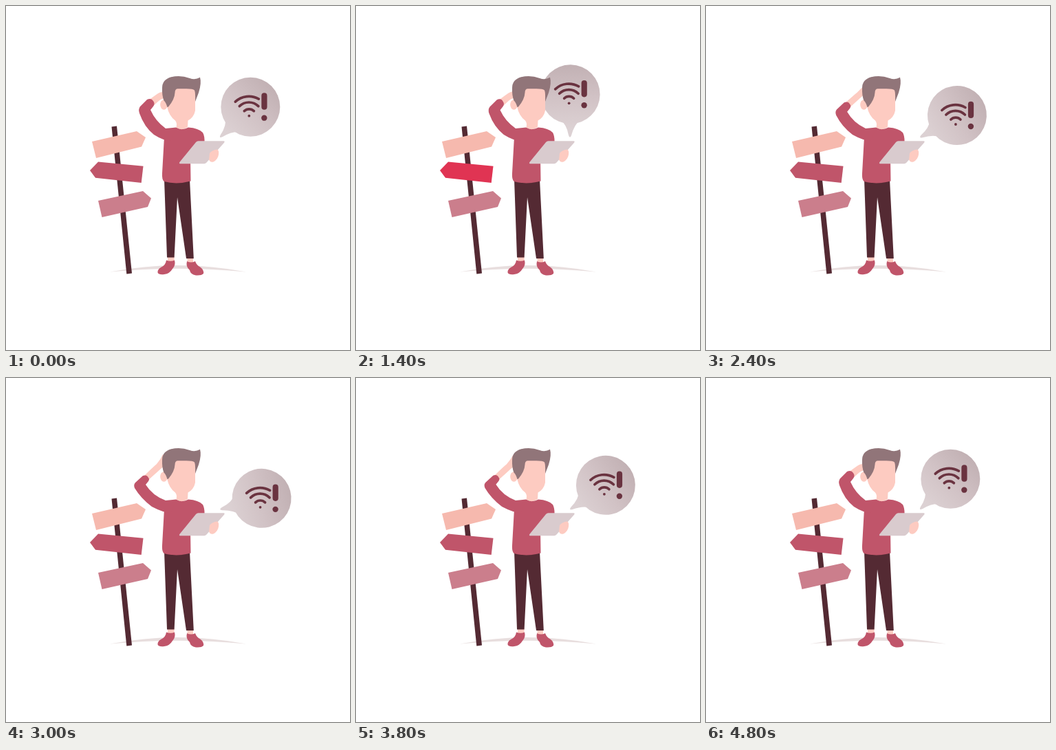
These frames come from a looping animation (500 by 500 pixels, 4840 ms). An HTML page:

```html
<!DOCTYPE html>
<html lang="en">
<head>
<meta charset="utf-8">
<title>Lost connection</title>
<style>
  html, body { margin: 0; width: 100%; height: 100%; overflow: hidden; background: #fff; }
  svg { display: block; width: 100vw; height: 100vh; }
  .dark { fill: #542a33; }
  .rose { fill: #c0556a; }
  .skin { fill: #fdcbc1; }
  .icon { fill: #6a3340; }
  .icon .arc { fill: none; stroke: #6a3340; stroke-width: 3.7; stroke-linecap: round; }
</style>
</head>
<body>
<svg viewBox="0 0 500 500">
  <defs>
    <linearGradient id="shade" gradientUnits="userSpaceOnUse" x1="311" y1="86" x2="311" y2="178">
      <stop offset="0" stop-color="#c2b1b4"/>
      <stop offset=".5" stop-color="#d1c2c5"/>
      <stop offset="1" stop-color="#dcd1d3"/>
    </linearGradient>
  </defs>

  <path fill="#e8dede" d="M151 386.5Q250 367.5 349 386.5Q250 377 151 386.5Z"/>

  <path class="dark" d="M153.5 175.5L161 174.5L183 388.5L175.3 389.5Z"/>
  <path id="sign1" d="M125 197L190 182L203 191L197 204.5L131 221Z"/>
  <path id="sign2" d="M134 226.5L199.5 232.7L196.7 257L130 249.7L122 239Z"/>
  <path fill="#cb7e8c" d="M134 283L199 269L211 279.5L206 292L139.5 307Z"/>

  <g id="bubble" fill="url(#shade)">
    <circle cx="311" cy="128.3" r="43"/>
    <path d="M296 165Q306 172 309 188Q311 193.5 313 188Q317 172 326 165Z"/>
  </g>
  <g id="icon" class="icon">
    <rect x="16" y="-20.3" width="8.2" height="24.4" rx="4.1"/>
    <circle cx="20" cy="16" r="4.2"/>
    <circle cx="-2" cy="13" r="1.9"/>
    <path class="arc" d="M-22 -7.5A29 29 0 0 1 12 -11.5"/>
    <path class="arc" d="M-16 -1A19.5 19.5 0 0 1 11.5 -1"/>
    <path class="arc" d="M-9 6A10 10 0 0 1 5 6"/>
  </g>

  <path class="skin" d="M235 363H244.5V373H235ZM263.5 364H272V374H263.5Z"/>
  <path class="dark" d="M230 252H267L272.8 367H262L249 278L244.6 365.5H234Z"/>
  <path class="rose" d="M233 369.5Q239 372 245 369.5Q247 377 242 382Q238 389 230 390Q222 391 220.5 387.5Q220 383 225 380Q232 377 233 369.5Z"/>
  <path class="rose" d="M263 371Q269 374 275 371Q277 377 283 380Q288 384 287 389Q284 392 276 391.4Q268 390 267 384Q261 379 263 371Z"/>

  <path id="forearm" class="skin"/>
  <path class="rose" d="M232 178Q240 177 247 176.5Q257 181 265 176.5Q280 177.5 286 184Q289 189 288.5 200L268 222L268.5 254.5Q248 260 229.5 255Q226.5 252 227 243L230 190Z"/>
  <path id="sleeve" class="rose"/>
  <path fill="#f2e3e5" d="M274.5 201L275.3 201L276 209L274.5 209Z"/>
  <path fill="#d9cbce" d="M279.5 196.3H316.5Q318.5 196.6 317 198.7L291.5 227.6Q290 229.2 288 229.2H253Q251 228.8 252.5 226.7L276 198Q277.5 196.3 279.5 196.3Z"/>
  <path class="skin" d="M296 214Q300 209 307 208.5Q310 210 309 216Q308 223 301.5 226.5Q296 227.5 295 223Z"/>

  <ellipse class="skin" cx="229.5" cy="143.5" rx="5.3" ry="7.3"/>
  <path class="skin" d="M244 118H275V152Q273 162 264.5 166.5L264 176Q256 182 247.5 176.5Q249 170 246 166.5Q237 160 234 146Z"/>
  <path fill="#917579" d="M227 119Q227 107 240 103.2Q254 100 267 105Q275 108 282 103.8Q284.5 112 280 126L275 139Q275.5 126 274 122.5Q272 120.3 262 120.3H250Q245.5 120.3 245.5 126Q245 136 236 146.5L234.5 147Q232 139 229.5 137.5Q226.5 130 227 119Z"/>
</svg>
<script>
const LOOP = 4840;
const $ = id => document.getElementById(id);
const lerp = (a, b, p) => a + (b - a) * p;

// CSS "ease": cubic-bezier(.25, .1, .25, 1)
function ease(x) {
  let lo = 0, hi = 1;
  const bez = (a, b, s) => 3 * a * s * (1 - s) ** 2 + 3 * b * s * s * (1 - s) + s ** 3;
  for (let i = 0; i < 22; i++) {
    const mid = (lo + hi) / 2;
    if (bez(.25, .25, mid) < x) lo = mid; else hi = mid;
  }
  return bez(.1, 1, lo);
}
const smooth = x => x * x * (3 - 2 * x);

// Steps are [time, value]
function track(steps, t, curve) {
  const i = steps.findIndex(s => s[0] > t);
  if (i < 1) return steps[i < 0 ? steps.length - 1 : 0][1];
  const [t0, a] = steps[i - 1], [t1, b] = steps[i];
  return lerp(a, b, curve((t - t0) / (t1 - t0)));
}

const SWING = [[0, 45], [1640, 0], [3230, 76], [4740, 45], [LOOP, 45]];
const SCRATCH = [[0, 0], [700, 1], [1540, 0], [2900, 1], [3650, 1], [4700, 0], [LOOP, 0]];
const PALE = [[320, 0], [600, 1], [720, 1], [1050, 0]];
const RED = [[1120, 0], [1350, 1], [1450, 1], [1720, 0]];

// Folded and raised poses share one structure
const SLEEVE = [
  "M205 136Q211 133 214 138Q217 142 214 146L210 151Q217 167 232 178L246 179L240 196Q229 196 215 187Q201 176 194 156Q192 150 195 146Z",
  "M199 142Q205 140 207 145Q209 147 207 150L203 155Q213 171 232 178L246 179L240 196Q229 196 212 187Q196 175 187 160Q185 155 188 152Z"
];
const FOREARM = [
  "M207 137Q218 129 222 126.5Q226 124 236 125L236 133Q226 134 222 138L212 147Z",
  "M201 142Q211 132 219 125Q225 118 228 111L236 118Q232 127 225 132L206 149Z"
];
const morph = ([a, b], p) => {
  const to = b.match(/[\d.]+/g);
  let i = 0;
  return a.replace(/[\d.]+/g, n => lerp(+n, +to[i++], p).toFixed(2));
};
const mix = (a, b, p) => `rgb(${a.map((v, i) => Math.round(lerp(v, b[i], p)))})`;

const PIVOT = [311, 191], REACH = 62.7;

function draw(now) {
  const t = now % LOOP;
  const angle = track(SWING, t, ease), rad = angle * Math.PI / 180;
  const x = PIVOT[0] + REACH * Math.sin(rad), y = PIVOT[1] - REACH * Math.cos(rad);
  $("bubble").setAttribute("transform", `rotate(${angle} ${PIVOT})`);
  $("icon").setAttribute("transform", `translate(${x} ${y})`);

  const lift = track(SCRATCH, t, smooth);
  $("sleeve").setAttribute("d", morph(SLEEVE, lift));
  $("forearm").setAttribute("d", morph(FOREARM, lift));

  $("sign1").setAttribute("fill", mix([246, 185, 174], [226, 185, 188], track(PALE, t, smooth)));
  $("sign2").setAttribute("fill", mix([192, 85, 106], [224, 52, 83], track(RED, t, smooth)));
}

const start = performance.now();
function tick() {
  draw(performance.now() - start);
  requestAnimationFrame(tick);
}
tick();
</script>
</body>
</html>
```
